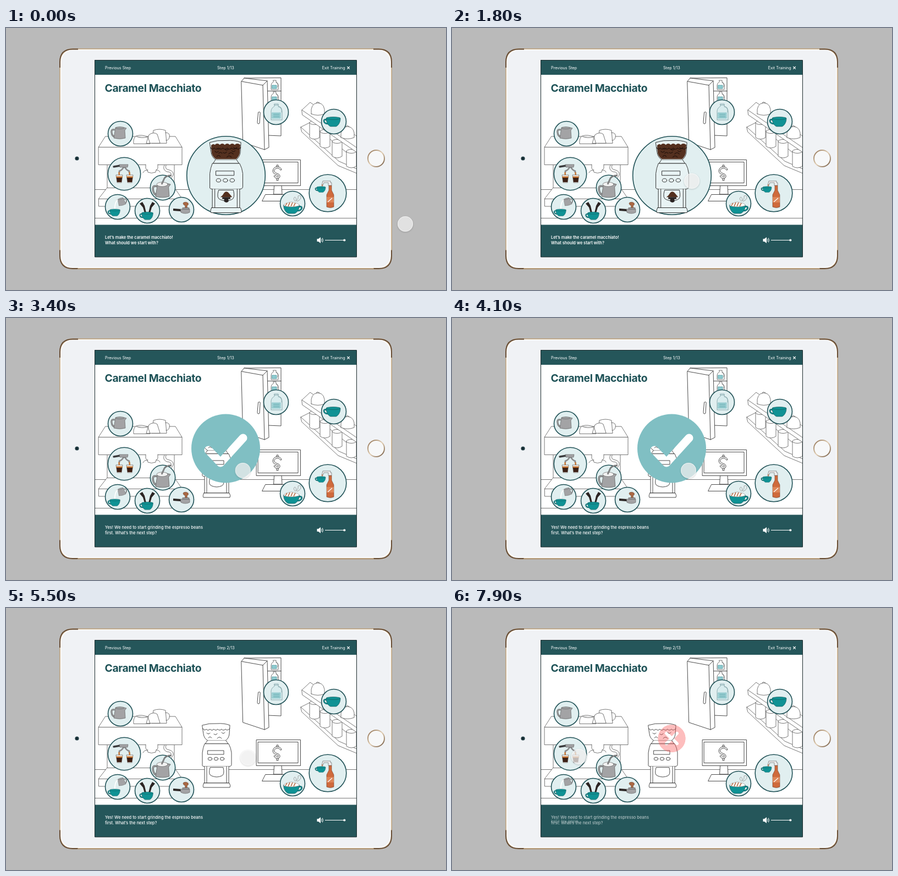
These frames come from a looping animation (800x476 px, 8000 ms). An HTML page:

```html
<!DOCTYPE html>
<html lang="en">
<head>
<meta charset="utf-8">
<title>Barista training</title>
<style>
html, body { margin: 0; width: 100%; height: 100%; overflow: hidden; background: #bababa; }
svg { display: block; width: 100vw; height: 100vh; }
text { font-family: Inter, "Open Sans", sans-serif; font-size: 7.25px; fill: #fff; }
.title { font-size: 19.3px; font-weight: 700; letter-spacing: -.38px; fill: #1d5156; }
.say { font-size: 7.42px; font-weight: 500; }
.say.bold { font-size: 7.4px; font-weight: 600; }
.line { fill: none; stroke: #2c2c2c; stroke-width: .85; stroke-linejoin: round; stroke-linecap: round; }
.thin { stroke: #555; stroke-width: .8; }
.white { fill: #fff; }
.bubble { fill: #e1eff0; stroke: #215257; stroke-width: 1.6; }
.teal { fill: #0f9294; stroke: #174f52; stroke-width: .6; }
.gray { fill: #a3a3a5; stroke: #555; stroke-width: .6; }
.brown { fill: #54301f; }
.dark { fill: #2b2423; }

.anim { animation: 8s linear infinite both; }
.cursor { animation-name: cursor; }
.first { animation-name: first; }
.second { animation-name: second; }
.retry { animation-name: retry; }
.check { animation-name: check; }
.cross { animation-name: cross; }
.step1 { animation-name: step1; }
.step2 { animation-name: step2; }
.check, .cross { transform-origin: 399.5px 237px; }

@keyframes cursor {
  0%, 3% { transform: translate(726px, 356px); animation-timing-function: cubic-bezier(.35, 0, .3, 1); }
  20% { transform: translate(437px, 278px); }
  22.5% { transform: translate(436px, 278px); }
  35%, 37.5% { transform: translate(431px, 277px); }
  51.25%, 60% { transform: translate(430px, 277px); animation-timing-function: ease-in-out; }
  68.75% { transform: translate(440px, 272px); animation-timing-function: cubic-bezier(.4, 0, .3, 1); }
  88% { transform: translate(236px, 268px); }
  92.5% { transform: translate(234px, 268px); }
  98.75%, 100% { transform: translate(231px, 270px); }
}
@keyframes first {
  0%, 34.375% { opacity: 1; }
  42.19%, 100% { opacity: 0; }
}
@keyframes second {
  0%, 34.375% { opacity: 0; }
  42.19%, 95.625% { opacity: 1; }
  100% { opacity: .5; }
}
@keyframes retry {
  0%, 95.625% { opacity: 0; }
  100% { opacity: .45; }
}
@keyframes check {
  0%, 34.375% { transform: scale(0); opacity: 0; }
  42.19%, 56.25% { transform: scale(1); opacity: 1; }
  62.5%, 100% { transform: scale(0); opacity: 0; }
}
@keyframes cross {
  0%, 95.625% { transform: scale(0); opacity: 0; }
  98.75% { transform: scale(.4); opacity: .4; }
  100% { transform: scale(.56); opacity: .56; }
}
@keyframes step1 {
  0%, 56.25% { opacity: 1; }
  62.5%, 100% { opacity: 0; }
}
@keyframes step2 {
  0%, 56.25% { opacity: 0; }
  62.5%, 100% { opacity: 1; }
}
</style>
</head>
<body>
<svg viewBox="0 0 800 476" preserveAspectRatio="none">
<defs>
  <linearGradient id="ring" x1="0" y1="0" x2="1" y2="1">
    <stop offset="0" stop-color="#8a6b4b"/>
    <stop offset=".5" stop-color="#e3cfb4"/>
    <stop offset="1" stop-color="#6b5038"/>
  </linearGradient>
  <radialGradient id="glow">
    <stop offset=".78" stop-color="#000" stop-opacity=".22"/>
    <stop offset="1" stop-color="#000" stop-opacity="0"/>
  </radialGradient>
  <clipPath id="screen"><path d="M161 58H637V416H161Z"/></clipPath>
  <mask id="tick">
    <path d="M330 170H470V305H330Z" fill="#fff"/>
    <path d="M368 240L390 263L431 218" fill="none" stroke="#000" stroke-width="15" stroke-linecap="round" stroke-linejoin="round"/>
  </mask>
  <mask id="ex">
    <path d="M330 170H470V305H330Z" fill="#fff"/>
    <path d="M376 214L423 260M423 214L376 260" stroke="#000" stroke-width="15" stroke-linecap="round"/>
  </mask>

  <!-- dark bend of the bezel, top left -->
  <path id="corner" d="M98 72V62Q98 38.5 121 38.5H131"/>

  <g id="grinder">
    <path d="M-26-55Q-14-59 0-58Q14-59 24-55L23-39Q22-31 16-27H-16Q-23-31-24-39Z"/>
    <path d="M-17-27L-21-21H21L17-27"/>
    <path d="M-22-21Q-25-14-26-5V16Q-27 20-22 20H22Q27 20 27 16V-5Q26-14 22-21Z"/>
    <path d="M-16-9H13V-2H-16Z"/>
    <ellipse cx="-12" cy="6" rx="3.7" ry="2.8"/>
    <ellipse cx="-1" cy="6" rx="3.7" ry="2.8"/>
    <ellipse cx="10" cy="6" rx="3.7" ry="2.8"/>
    <path d="M-22 20V50H22V20M-18 20V50M18 20V50"/>
    <path d="M-12 22Q-16 35-9 37Q0 41 9 37Q15 35 12 22Z"/>
    <path d="M-23 50H23Q26 55 24 58H-24Q-26 55-23 50Z"/>
  </g>
  <path id="beanEdge" d="M-25-49q3 5 6 1q3 4 7 0q3 4 7 0q3 4 7 0q3 4 7 0q3 4 7 0q3 4 8-1"/>
  <path id="beans" d="M-18-41q3 4 6 0M-5-39q4 3 6-1M9-42q3 4 6 0M-15-32q3-4 6 0M1-31q4-5 8 0"/>

  <g id="jug" class="line thin white">
    <path d="M-2-9H3V-6Q7-4 7 0V8H-6V0Q-6-4-2-6ZM3-5Q8-4 6 3"/>
    <path d="M-4 0H4V6H-4Z" style="fill:#8fcbd0;stroke:#4c9aa1"/>
  </g>
  <g id="cup">
    <path d="M-11-3Q-17-5-17-1Q-16 4-9 4" fill="none" stroke="#174f52" stroke-width="2.6"/>
    <path d="M-11-3Q-17-5-17-1Q-16 4-9 4" fill="none" stroke="#0f9294" stroke-width="1.5"/>
    <path class="teal" d="M-13-6C-13 3-8 8-5 9H5C8 8 13 3 13-6Z"/>
    <ellipse class="teal" cx="0" cy="-6" rx="13" ry="2.4"/>
  </g>
  <g id="pitcher">
    <path d="M-9-6Q-16-8-15-1Q-14 6-10 6" fill="none" stroke="#555" stroke-width="2.8"/>
    <path d="M-9-6Q-16-8-15-1Q-14 6-10 6" fill="none" stroke="#a3a3a5" stroke-width="1.6"/>
    <path class="gray" d="M-8-10Q0-12 8-10L12-9L9-5L10 9Q0 12-11 9Z"/>
    <ellipse class="gray" cx="0" cy="-9.5" rx="8" ry="1.8"/>
  </g>
  <g id="shot">
    <path d="M-6-6H6L4 8H-4Z" fill="#f6f3ee" stroke="#444" stroke-width=".6"/>
    <path d="M-5.3-2H5.3L4 7H-4Z" fill="#3c2016"/>
    <path d="M-5.7-3.5H5.7L5.3-1H-5.3Z" fill="#c87431"/>
  </g>
  <g id="jar" class="line thin white">
    <path d="M-9-12V15Q0 21 9 15V-12"/>
    <ellipse cx="0" cy="-12" rx="9" ry="3.5"/>
  </g>
  <path id="dome" class="line thin white" d="M-12 8Q-14-11 0-12Q14-11 12 8Q0 13-12 8ZM-3-12Q-2-15 3-12"/>
</defs>

<!-- tablet -->
<path d="M0 0H800V476H0Z" fill="#bababa"/>
<rect x="97.5" y="37.5" width="604" height="400.5" rx="23" fill="#f0f2f5" stroke="#b39a7b"/>
<rect x="98.6" y="38.6" width="601.8" height="398.3" rx="22" fill="none" stroke="#ddc9ae" stroke-width="1.4"/>
<rect x="100.2" y="40.2" width="598.6" height="395" rx="20.5" fill="none" stroke="#fff" stroke-width="1.2"/>
<g fill="none" stroke="#664c34" stroke-width="1.9">
  <use href="#corner"/>
  <use href="#corner" transform="matrix(-1 0 0 1 799 0)"/>
  <use href="#corner" transform="matrix(1 0 0 -1 0 475.5)"/>
  <use href="#corner" transform="matrix(-1 0 0 -1 799 475.5)"/>
  <path d="M130 437.3H669" stroke="#a98b67" stroke-width="1.4"/>
</g>
<circle cx="129" cy="237" r="3.6" fill="#203b42"/>
<circle cx="128.6" cy="237" r="1.5" fill="#102328"/>
<circle cx="673" cy="237" r="15" fill="#f7f8f9" stroke="url(#ring)" stroke-width="2"/>

<g clip-path="url(#screen)">
  <path class="white" d="M161 58H637V416H161Z"/>

  <!-- room -->
  <path class="line thin" d="M161 293.5H637M161 345.5H637"/>
  <g class="line thin white">
    <path d="M181 197H308L320 216.5H168.5Z"/>
    <path d="M184 248V290L168.5 310V324H320V310L306 290V248Z"/>
    <path d="M168.5 216.5H320V248.5H168.5Z"/>
    <path d="M184 290.5H306M168.5 310.5H320"/>
    <path d="M265 209L268 186Q279 182 290 186L292 209ZM290 190Q299 190 297 199Q295 205 291 204"/>
    <path d="M255 209L260 194Q268 188 275 193L280 209ZM232 210Q231 199 237 196Q247 193 258 198L262 210ZM237 197Q246 201 257 198"/>
    <path d="M254 248V255Q258 258 258 262Q264 265 272 262Q272 258 276 255V248M258 258Q251 258 249 263M273 258Q279 258 280 262"/>
    <path d="M291 249Q288 257 297 258Q305 260 304 267Q302 272 297 275L295 272Q301 269 300 264Q298 261 292 261Q284 257 288 249"/>
  </g>

  <!-- fridge -->
  <g class="line white">
    <path d="M433 91L500 90.5V196L476 195L470 100Z"/>
    <path d="M476 114.5H500M476 135.5H500"/>
    <path d="M428 97L433 91L475 96L478 217L470 221L431 208Z"/>
    <path d="M428 97L467 104L470 221M467 104L475 96"/>
    <path d="M459 153Q463 151 462 156L461 173Q457 176 457 171Z"/>
  </g>
  <use href="#jug" x="488" y="104"/>
  <use href="#jug" x="488" y="125"/>

  <!-- register -->
  <g class="line white">
    <path d="M472 302.5H506L512 314.5H466Z"/>
    <path d="M488 286H501L502 302H487Z"/>
    <path d="M455.5 239.5H535.5V286.5H455.5Z"/>
    <path d="M458.5 243.5H531V281.5H458.5Z"/>
    <path d="M499 258Q497 254 492 255Q486 257 488 261Q490 264 495 265Q500 268 497 272Q491 276 487 269L490 268Q492 272 495 270Q497 268 493 267Q485 265 485 259Q487 252 493 252Q499 252 501 257ZM492 252V249H495V252M492 274V277H495V273"/>
  </g>

  <!-- cup shelf -->
  <g class="line thin white">
    <path d="M536 180L552 172L640 243V265L604 250L538 189Z"/>
    <path d="M536 180L605 242L640 257"/>
    <use href="#jar" x="561" y="184"/>
    <use href="#jar" x="580" y="200"/>
    <use href="#jar" x="602" y="218"/>
    <use href="#jar" x="628" y="236"/>
    <path d="M538 149L553 135L645 202V231L539 158Z"/>
    <path d="M538 149L640 219"/>
    <use href="#dome" x="567" y="148"/>
    <use href="#dome" x="621" y="191"/>
  </g>

  <g class="line white" transform="translate(383 268)">
    <use href="#grinder"/>
    <use href="#beanEdge"/>
    <use href="#beans"/>
  </g>

  <!-- large grinder -->
  <g class="anim first">
    <circle class="bubble" cx="400" cy="268" r="71.3"/>
    <g transform="translate(400 270) scale(1.13)">
      <g class="line" style="fill:#e8f3f4"><use href="#grinder"/></g>
      <path class="brown" d="M-24-50q3-4 6-1q4-4 8 0q4-4 8 0q4-4 8 0q4-4 8 0q4-4 9 0L22-38Q21-32 16-28H-16Q-22-32-23-38Z"/>
      <g fill="none" stroke="#21110b" stroke-width=".9">
        <use href="#beans"/>
        <use href="#beans" x="3" y="-5"/>
        <use href="#beanEdge" y="2"/>
      </g>
      <path class="brown" d="M-9 33Q-5 30-3 26Q1 22 5 27L10 33Z"/>
      <path class="dark" d="M-6 33H7V36H4V40Q1 43-3 40V36H-6Z"/>
    </g>
  </g>

  <!-- ingredient bubbles -->
  <circle class="bubble" cx="208" cy="192" r="22.5"/>
  <use href="#pitcher" x="207" y="191"/>

  <circle class="bubble" cx="215" cy="265" r="29.7"/>
  <path d="M196 252L208 250" stroke="#3c3c3e" stroke-width="3.4" stroke-linecap="round"/>
  <path d="M214 252Q212 258 206 260V263M216 252Q218 258 224 260V263" fill="none" stroke="#8b8b8d" stroke-width="2.6"/>
  <path class="gray" d="M206 248H222L221 253H207Z"/>
  <path d="M205.5 262L206 270M224.5 262L225 270" stroke="#c87431" stroke-width="2.4"/>
  <use href="#shot" x="206" y="273"/>
  <use href="#shot" x="225" y="273"/>

  <circle class="bubble" cx="285" cy="290" r="22.7"/>
  <use href="#pitcher" transform="translate(285 295) scale(1.18 1.22)"/>
  <ellipse cx="284" cy="284" rx="10" ry="4" fill="#f2f2f2" stroke="#555" stroke-width=".6"/>
  <path d="M301 268Q291 268 288 273L283 284" fill="none" stroke="#333" stroke-width="2.4"/>
  <path d="M301 268Q291 268 288 273L283 284" fill="none" stroke="#c9c9cb" stroke-width="1"/>

  <circle class="bubble" cx="203" cy="325" r="22.5"/>
  <use href="#pitcher" transform="translate(210 316) rotate(-14) scale(-.62 .62)"/>
  <path d="M203 312Q197 318 198 330" fill="none" stroke="#fff" stroke-width="1.8"/>
  <use href="#cup" transform="translate(198 335) scale(.72)"/>

  <circle class="bubble" cx="257" cy="332" r="22.5"/>
  <path class="dark" d="M243 319L248 316L252 323L255 336H252L249 326ZM271 319L266 316L262 323L259 336H262L265 326Z"/>
  <use href="#cup" transform="translate(257 341) scale(.8)"/>

  <circle class="bubble" cx="319" cy="330" r="22.5"/>
  <path class="dark" d="M304 328L318 329V333L304 332Z"/>
  <path class="gray" d="M317 329H334V335Q326 339 318 335Z"/>
  <path d="M325 327L326 323Q320 320 323 317Q328 315 331 318Q333 321 329 323L330 327Z" fill="#a96843" stroke="#5b3826" stroke-width=".5"/>
  <path class="gray" d="M321 326.5H333V329H321Z"/>

  <circle class="bubble" cx="491" cy="153" r="22.5"/>
  <g class="line" style="stroke:#7d9fa3;fill:#d8ecee">
    <path d="M488 138H495V142Q502 146 502 152V167H482V151Q482 146 488 142ZM495 143Q503 142 501 153M488 140H495"/>
    <path d="M484 154H499V164H484Z" style="fill:#a9d7da;stroke:#7dbcc2"/>
    <path d="M486 156.5H497M486 159H497M486 161.5H497" style="stroke:#4a9ba2"/>
  </g>

  <circle class="bubble" cx="596" cy="170" r="22.5"/>
  <use href="#cup" x="595" y="170"/>

  <circle class="bubble" cx="521" cy="319" r="22.5"/>
  <use href="#cup" transform="translate(519 328) scale(-1.1 1)"/>
  <path d="M505 323Q506 318 512 318Q519 314 526 318Q533 318 533 323Q519 327 505 323Z" fill="#fff" stroke="#777" stroke-width=".5"/>
  <path d="M508 323L511 318M513 324L516 317M518 324L521 317M523 324L526 318" stroke="#a9592d" stroke-width="1.4"/>
  <path class="line" d="M526 315Q521 310 525 307Q529 309 527 314Q532 312 531 305Q537 303 536 309Q534 314 529 315" style="stroke:#999"/>

  <circle class="bubble" cx="585" cy="300" r="33.8"/>
  <path d="M583 303L587 295V286H592V295L596 303V325Q590 328 583 325Z" fill="#cf6a3c" stroke="#6f3925" stroke-width=".6"/>
  <path d="M583 307H596V317H583Z" fill="#dd8558"/>
  <path d="M585 316L593 309" stroke="#fff" stroke-width="1.2"/>
  <path class="gray" d="M586 286V281H578L576 286H574L576 278H590V281H592V286Z" style="fill:#eee"/>
  <path d="M575 284V292" stroke="#b86231" stroke-width="1.2"/>
  <use href="#cup" transform="translate(573 293) scale(.62)"/>

  <!-- bars -->
  <path d="M161 58H637V85H161ZM161 357.5H637V416H161Z" fill="#25565a"/>
  <text x="180" y="74.7">Previous Step</text>
  <text class="anim step1" x="399.3" y="74.7" text-anchor="middle">Step 1/13</text>
  <text class="anim step2" x="399.6" y="74.7" text-anchor="middle">Step 2/13</text>
  <text x="574.7" y="74.7">Exit Training</text>
  <path d="M620.3 70L624.8 74.6M624.8 70L620.3 74.6" stroke="#fff" stroke-width="1.1"/>
  <text class="title" x="179.6" y="116.2">Caramel Macchiato</text>

  <g class="anim first">
    <text class="say bold" x="180" y="383">Let’s make the caramel macchiato!</text>
    <text class="say bold" x="180" y="393">What should we start with?</text>
  </g>
  <g class="anim second">
    <text class="say" x="180" y="383">Yes! We need to start grinding the espresso beans</text>
    <text class="say" x="180" y="393">first. What’s the next step?</text>
  </g>
  <text class="say anim retry" x="180" y="389.5">Let’s try again.</text>

  <path class="white" d="M565.5 383H568L572 380V391L568 388H565.5Z"/>
  <path d="M573.5 383Q575 385.5 573.5 388M575.2 381.5Q578 385.5 575.2 389.5" fill="none" stroke="#fff" stroke-width="1"/>
  <path d="M580 385.5H615" stroke="#fff" stroke-width="1.1"/>
  <circle class="white" cx="615.3" cy="385.5" r="2.1"/>

  <!-- answers -->
  <g class="anim check"><circle cx="399.5" cy="237" r="62.5" fill="#80bfc3" mask="url(#tick)"/></g>
  <g class="anim cross"><circle cx="399.5" cy="237" r="62.5" fill="#fb5a5a" mask="url(#ex)"/></g>
</g>
<path d="M161.5 58.5H637.5V416H161.5Z" fill="none" stroke="#1c2b2d"/>

<g class="anim cursor">
  <circle cy="1" r="16.5" fill="url(#glow)" opacity=".5"/>
  <circle r="14" fill="#f6f6f6" fill-opacity=".72"/>
  <circle r="13.5" fill="none" stroke="#fff" stroke-opacity=".5" stroke-width="1"/>
</g>
</svg>
</body>
</html>
```
